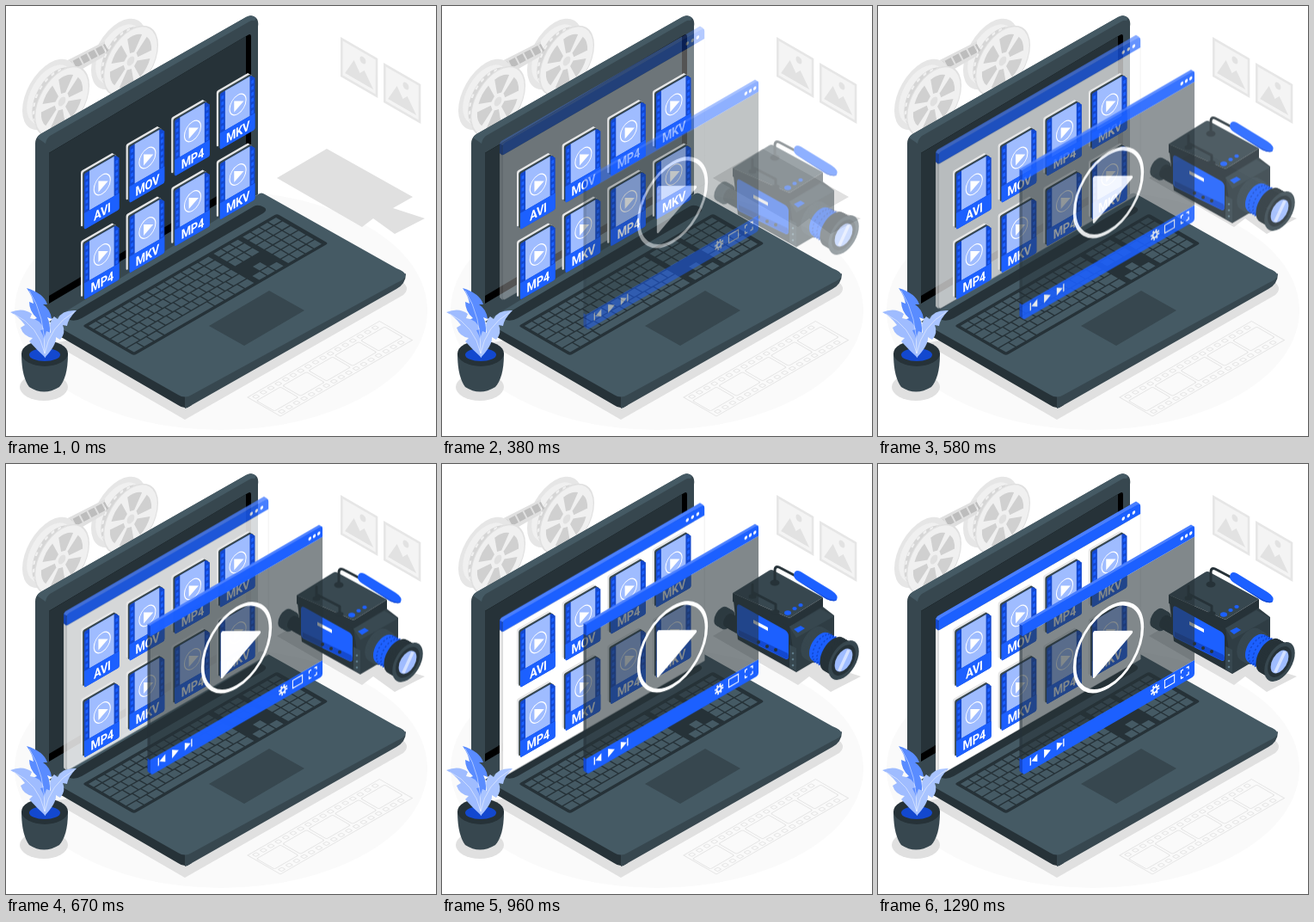
Recreate the animation shown at these times as an HTML page. Size 500 by 500 pixels, loop 1.33 s.

```html
<!DOCTYPE html>
<html lang="en">
<head>
<meta charset="utf-8">
<title>Video player</title>
<style>
html, body { margin: 0; width: 100%; height: 100%; overflow: hidden; background: #fff; }
svg { display: block; width: 100vw; height: 100vh; }
text { font: 700 15px Roboto, Arial, sans-serif; font-stretch: 75%; letter-spacing: -.3px; fill: #fff; text-anchor: middle; }
</style>
</head>
<body>
<svg viewBox="0 0 500 500">
  <ellipse cx="250" cy="354" rx="240" ry="139" fill="#fafafa"/>
  <g id="reels"></g>
  <g id="photos"></g>
  <g id="film" fill="none" stroke="#e6e6e6" stroke-width="1.2"></g>
  <path fill="#e0e0e0" d="M315 200L373 166L473 222L450 235L487 247L452 265L427 247L414 257Z"/>

  <g id="laptop">
    <path fill="#e0e0e0" d="M54 392L208 481L462 336Q470 328 462 322Z"/>
    <path fill="#37474f" d="M34 160Q34 153 40 149L279 13Q286 9 291 14Q294 17 293 24V219L60 368L34 350Z"/>
    <path fill="#455a64" d="M36 153Q37 151 40 149L279 13Q286 9 291 14L289 17Q286 16 283 18L51 151Q47 154 46 160Z"/>
    <path d="M50 171L281 34Q285 31 285 36V207L50 346Z"/>
    <path fill="#263238" d="M50 171L279 35V201L50 337Z"/>
    <path fill="#263238" d="M52 366V378L200 464Q208 470 216 464L208 440Z"/>
    <path fill="#37474f" d="M208 440V468Q212 467 216 464L454 329Q465 323 465 311Z"/>
    <path fill="#455a64" d="M50 367L293 219Q297 216 301 219L454 305Q475 313 454 322L216 452Q208 457 200 452Z"/>
    <path fill="#263238" d="M68 362L288 233Q293 230 300 234Q305 237 299 241L88 363Q81 367 74 365Z"/>
    <path fill="#37474f" d="M236 372L306 331L347 354L277 395Z"/>
    <g id="keys" transform="matrix(.866 -.5 .866 .5 89 372)"></g>
  </g>

  <g id="page">
    <path fill="#e6e6e6" d="M67 191L70.500 193V362L67 359Z"/>
    <path fill="#1348cf" d="M67 180L70.500 181V194L67 191Z"/>
    <path fill="#4a7fff" d="M67 180L69 177L300 43.500L304 46L70.500 182Z"/>
    <g transform="matrix(.866 -.5 0 1 70.500 180.500)">
      <path fill="#fff" stroke="#e6e6e6" stroke-width=".6" d="M0 13H271V182H4Q0 182 0 178Z"/>
      <path fill="#1c60ff" d="M0 13V3Q0 0 3 0H267Q271 0 271 4V13Z"/>
      <g fill="#fff"><circle cx="248" cy="7" r="2"/><circle cx="255" cy="7" r="2"/><circle cx="262" cy="7" r="2"/></g>
    </g>
  </g>

  <g id="files"></g>

  <g id="camera">
    <g id="eyepiece"></g>
    <!-- body -->
    <path fill="#263238" d="M338 152L404 190L412 196V244L344 206Z"/>
    <path fill="#2f3d44" d="M404 190L443 158V168L456 178V218L412 244Z"/>
    <path fill="#37474f" d="M338 152L380 126Q383 124 386 126L443 157L404 181Z"/>
    <path fill="#263238" d="M338 152L404 181L443 157V167L404 191L338 162Z"/>
    <path fill="#37474f" d="M404 191L440 170L456 179L412 204Z"/>
    <path fill="#1c60ff" d="M343 168Q343 164 347 166L399 195Q403 198 403 202V225Q403 231 398 228L347 203Q343 201 343 197Z"/>
    <path fill="#1348cf" d="M345 201L399 228Q403 230 403 225L402 222L345 195Z"/>
    <path fill="#fff" d="M362 183L379 192V196L362 187Z"/>
    <g fill="#263238"><circle cx="368" cy="209" r="2"/><circle cx="378" cy="214" r="2"/><circle cx="388" cy="218" r="2"/></g>
    <path fill="#37474f" d="M404 212L412 216V243L404 239Z"/>
    <g fill="#607d8b"><circle cx="408" cy="222" r="1.300"/><circle cx="408" cy="229" r="1.300"/><circle cx="408" cy="236" r="1.300"/></g>
    <path fill="#1c60ff" d="M409 194L417 190L422 193L414 198Z"/>
    <g fill="#1c60ff"><ellipse cx="402" cy="175" rx="4" ry="2.700"/><ellipse cx="410" cy="170" rx="2.700" ry="2"/><ellipse cx="417" cy="166" rx="2.700" ry="2"/></g>
    <!-- handle and microphone -->
    <path fill="none" stroke="#263238" stroke-width="3" stroke-linecap="round" stroke-linejoin="round" d="M361 155V142M361 151L388 165V173M387 140V126Q387 119 394 123L411 132"/>
    <g fill="#263238"><ellipse cx="361" cy="156" rx="4.500" ry="2.700"/><ellipse cx="388" cy="174" rx="4.500" ry="2.700"/><ellipse cx="387" cy="140" rx="5.500" ry="3.500"/></g>
    <path fill="#1c60ff" d="M409 131Q410 124 417 127L453 149Q462 155 459 160Q456 163 447 159L414 138Q409 135 409 131Z"/>
    <path fill="#1348cf" d="M411 136L446 157Q454 161 459 160Q456 163 447 159L414 138Z"/>
    <g id="lens"></g>
  </g>

  <g id="player">
    <path fill="#263238" fill-opacity=".75" d="M168 200L164.500 198V343L168 345Z"/>
    <path fill="#1348cf" d="M168 187L164.500 186V198L168 200ZM168 344L164.500 342V357L168 360Z"/>
    <path fill="#4a7fff" d="M168 188L164.500 186L364 70.500L368 73Z"/>
    <g transform="matrix(.866 -.5 0 1 168 187)">
      <rect y="13" width="231" height="143.500" fill="#263238" fill-opacity=".58"/>
      <path fill="#1c60ff" d="M0 13V0H228Q231 0 231 3V13ZM0 156.500H231V172Q231 175 228 175H4Q0 175 0 171Z"/>
      <g fill="#fff">
        <circle cx="214" cy="6.500" r="2"/><circle cx="220" cy="6.500" r="2"/><circle cx="226" cy="6.500" r="2"/>
        <path d="M10 160h1.500v9h-1.500zM20 160v9l-8 -4.500zM29 159.500v10l9 -5zM46 160v9l8 -4.500zM54.500 160h1.500v9h-1.500z"/>
        <path stroke="#fff" stroke-width="4" stroke-linejoin="round" d="M96.500 57.500V108L146 82Z"/>
      </g>
      <g fill="none" stroke="#fff">
        <circle cx="115.500" cy="84" r="45.500" stroke-width="4"/>
        <circle cx="178" cy="164.500" r="3" stroke-width="2"/>
        <circle cx="178" cy="164.500" r="5" stroke-width="2" stroke-dasharray="2 1.927"/>
        <rect x="191" y="160" width="13" height="9" stroke-width="1.200"/>
        <path stroke-width="1.400" d="M213 163v-3h3M220 160h3v3M223 166v3h-3M216 169h-3v-3"/>
      </g>
    </g>
  </g>

  <g id="plant">
    <ellipse cx="44" cy="443" rx="28" ry="16" fill="#e0e0e0"/>
    <path fill="#37474f" d="M18 404C18 425 22 436 27 443Q44 454 62 443C68 436 72 425 72 404Z"/>
    <ellipse cx="45" cy="404" rx="27" ry="15" fill="#263238"/>
    <ellipse cx="45" cy="405.500" rx="18" ry="7.500" fill="#1348cf"/>
    <path fill="#5a8cff" d="M24 328Q44 334 48 347L43 347Q52 353 53 364L48 362Q55 375 46 408Q37 380 31 365L36 363Q27 355 27 344L32 346Q31 338 24 328Z"/>
    <path fill="#9fbcff" d="M5 356Q20 350 30 358L28 363Q40 364 44 376L40 377Q47 388 46 409Q36 400 27 390L31 386Q20 384 17 374L22 371Q15 361 5 356Z"/>
    <path fill="#a9c4ff" d="M82 354Q72 364 71 372L66 371Q70 380 63 388L58 385Q59 394 45 409Q41 392 47 378L52 380Q49 367 56 361L60 364Q65 353 82 354Z"/>
    <path fill="none" stroke="#fff" stroke-opacity=".6" stroke-width=".8" d="M27 331Q46 361 45 404M9 358Q38 372 45 404M79 356Q51 372 45 404"/>
  </g>
</svg>
<script>
const LOOP = 1330;
const EASE = 'cubic-bezier(.36,-.01,.5,1.38)';
const $ = id => document.getElementById(id);
const times = (n, f) => Array.from({ length: n }, (_, i) => f(i)).join('');
const rect = (x, y, w, h, more = '') => `<rect x="${x}" y="${y}" width="${w}" height="${h}" ${more}/>`;
const wall = (x, y, s) => `<g transform="matrix(.866 -.5 0 1 ${x} ${y})">${s}</g>`;
const side = (x, y, s) => `<g transform="matrix(.866 .5 0 1 ${x} ${y})">${s}</g>`;
const floor = (x, y, s) => `<g transform="matrix(.866 -.5 .866 .5 ${x} ${y})">${s}</g>`;

// A cylinder along the camera axis, as a stack of discs.
const tube = (x, y, n, r, fill) =>
  times(n, i => wall(x + i, y + i * .577, `<circle r="${r}" fill="${fill}"/>`));

function reel(x, y) {
  const hole = i => `<path transform="rotate(${i * 60 + 12})" fill="#d0d0d0" d="M-3 -9L-10 -26Q0 -30 10 -26L3 -9Z"/>`;
  return wall(x - 14, y - 8, '<circle r="37" fill="#e6e6e6"/><circle r="31" fill="#f0f0f0"/>') +
    wall(x - 7, y - 4, '<circle r="32" fill="#d6d6d6"/><circle r="30" fill="none" stroke="#f0f0f0" stroke-width="3" stroke-dasharray="4 5"/>') +
    wall(x, y, `<circle r="37" fill="#e0e0e0"/><circle r="35.5" fill="#f0f0f0"/>${times(6, hole)}
      <circle r="5" fill="#e0e0e0"/>`);
}

function photo(x, y) {
  return side(x, y, rect(0, 0, 50, 46, 'fill="#e6e6e6"') + rect(3, 3, 44, 40, 'fill="#f4f4f4"') +
    '<path fill="#e2e2e2" d="M6 39L18 18L26 29L32 23L44 39Z"/><circle cx="30" cy="12" r="4" fill="#e2e2e2"/>');
}

function film() {
  const holes = i => rect(4 + i * 10, 2.5, 5, 4.5, 'rx="1"') + rect(4 + i * 10, 37, 5, 4.5, 'rx="1"');
  return floor(281, 455, rect(0, 0, 177, 44) + times(17, holes) +
    times(5, i => rect(2 + i * 35, 10, 32, 24, 'rx="2"')));
}

function keys() {
  const key = (x, r, w) => rect(x, r ? 2 + r * 10.8 : 4, w, r ? 9.2 : 7);
  const row = (x, r, n, w = 9.8) => times(n, i => key(x + i * (w + 1.6), r, w));
  let s = rect(0, 0, 261, 69, 'rx="3" fill="#263238"') + '<g fill="#455a64">';
  for (let r = 0; r < 5; r++) {
    const lead = r ? 7 + r * 2.6 : 9.8;
    const n = r > 3 ? 12 : 13;
    s += key(4, r, lead) + row(5.6 + lead, r, n - 1);
    const end = 5.6 + lead + (n - 1) * 11.4;
    s += key(end, r, 165 - end);
  }
  s += row(4, 5, 3, 12) + key(45, 5, 66) + row(112.6, 5, 4, 11.9);
  s += times(3, r => row(172, r, 3)) + key(183.4, 4, 9.8) + row(172, 5, 3);
  s += times(6, r => row(211, r, 4, 10));
  return s + '</g>';
}

function file(name, x, y) {
  const shape = 'M0 2Q0 0 2 0H42L47 5V63Q47 65 45 65H2Q0 65 0 63Z';
  const hole = i => rect(1.8, 4 + i * 7, 3.2, 4) + rect(42, 6 + i * 7, 3.2, 4);
  return wall(x - 4, y - 3, `<path fill="#e6e6e6" d="${shape}"/>`) +
    wall(x - 1.8, y - 1.4, `<path fill="#37474f" d="${shape}"/>`) +
    wall(x, y, `<path fill="#1348cf" d="${shape}"/><g fill="#1c60ff">${times(6, hole)}</g>
      ${rect(7, 0, 33, 46, 'fill="#9fbcff"')}
      <path fill="#1c60ff" d="M0 46H47V63Q47 65 45 65H2Q0 65 0 63Z"/>
      <circle cx="24" cy="24.5" r="11" fill="none" stroke="#fff" stroke-width="1.2"/>
      <path fill="#fff" d="M19 18V31L32 24.5Z"/>
      <text x="24" y="61.5">${name}</text>`);
}

$('reels').innerHTML = reel(145, 64) +
  '<path fill="#e0e0e0" d="M52 73L115 41V58L70 84Z"/>' +
  '<path fill="none" stroke="#bdbdbd" stroke-width="9" stroke-dasharray="8 2" d="M62 77L117 48"/>' +
  reel(65, 111);
$('photos').innerHTML = photo(389, 36) + photo(439, 66);
$('film').innerHTML = film();
$('keys').innerHTML = keys();
$('files').innerHTML = ['AVI MOV MP4 MKV', 'MP4 MKV MP4 MKV'].map((line, r) =>
  line.split(' ').map((name, c) => file(name, 91 + c * 52.6, 195 - c * 31 + r * 81.5)).join('')).join('');
$('eyepiece').innerHTML = tube(325, 179, 8, 10, '#37474f') + tube(333, 183.6, 14, 7, '#263238');
$('lens').innerHTML = tube(432, 209.8, 8, 17, '#37474f') + tube(440, 214.4, 18, 15, '#1c60ff') +
  [444, 449].map(x => wall(x, 214.4 + (x - 440) * .577,
    '<circle r="15" fill="none" stroke="#1348cf" stroke-width="2" stroke-dasharray="2 2"/>')).join('') +
  tube(455, 223, 12, 18, '#263238') +
  wall(467, 230, '<circle r="20.5" fill="#37474f"/><circle r="16" fill="#263238"/><circle r="12" fill="#9fbcff"/>' +
    '<path fill="#d4e1ff" d="M-8 8L5 -10L9 -7L-4 11Z"/>');

// Slide and fade in with a slight overshoot, then hold to the end of the loop.
function enter(id, dy, ms) {
  const rest = { opacity: 1, transform: 'translateY(0px)' };
  $(id).animate([
    { opacity: 0, transform: `translateY(${dy}px)`, easing: EASE },
    { ...rest, offset: ms / LOOP },
    rest
  ], { duration: LOOP, iterations: Infinity });
}
enter('page', -30, 1250);
enter('player', 30, 1000);
enter('camera', 72, 1000);
</script>
</body>
</html>
```
